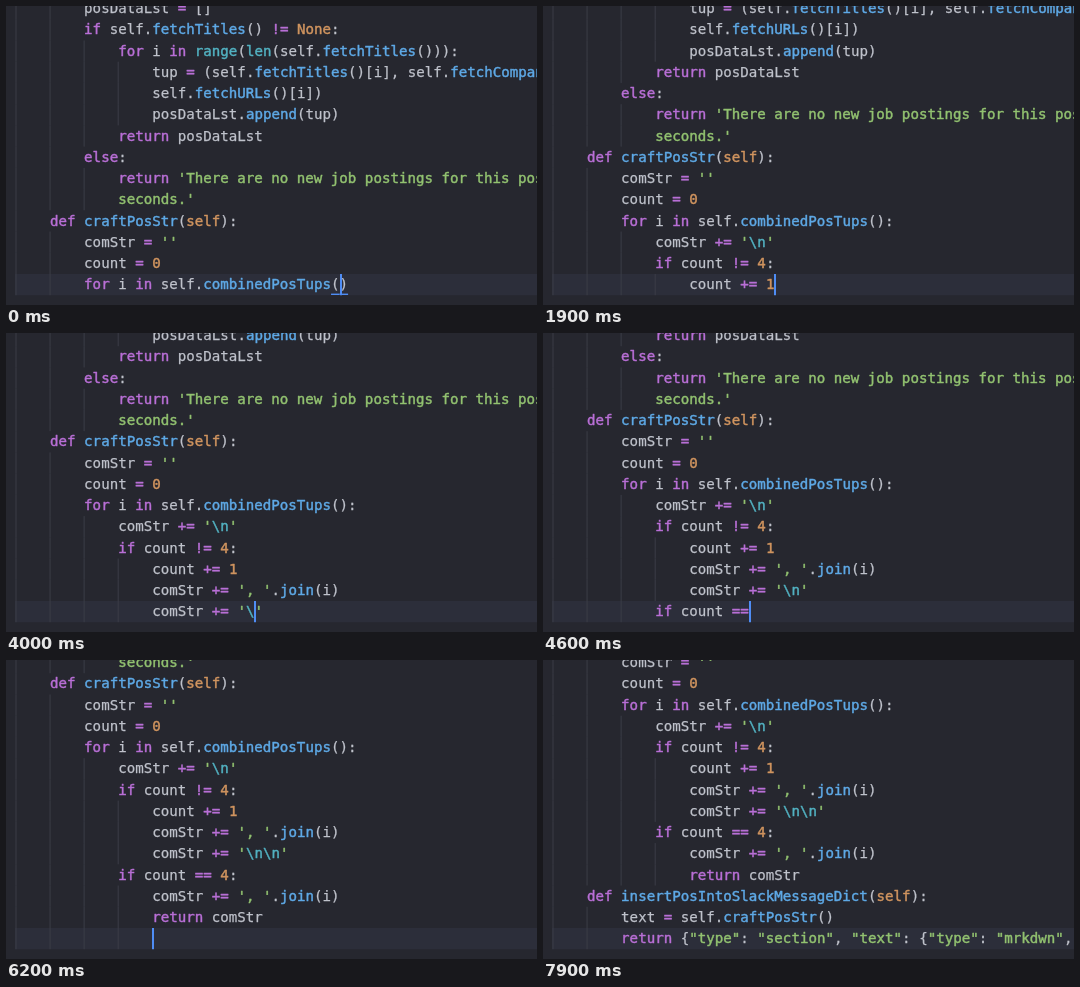
Animation, 531 px wide and 299 px high, one loop 8000 ms. Source, as an HTML page with a canvas:

```html
<!DOCTYPE html>
<html lang="en">
<head>
<meta charset="utf-8">
<title>Typing code</title>
<style>
html, body { margin: 0; width: 100%; height: 100%; overflow: hidden; background: #26272f; }
canvas { display: block; }
</style>
</head>
<body>
<canvas id="stage" width="531" height="299"></canvas>
<script>
const ctx = document.getElementById('stage').getContext('2d');
const LOOP = 8000, STEP = 100;
const LEFT = 10, CHAR = 8.515, PITCH = 21.23, LAST_TOP = 268, BASE = 15.2;
const MONO = '"DejaVu Sans Mono", monospace';
const FONT = '14.14px ' + MONO;
const C = {
  bg: '#26272f', line: '#2c2e3a', guide: '#3b3d47', text: '#bfc2cb', key: '#b96fd6',
  fn: '#5ea9e6', str: '#92c270', num: '#d0945f', esc: '#52b2c2', caret: '#4f8df5'
};

// [indent, text, start, end, midTime, midCount]; rows without times are already there
const rows = [
  [8, 'posDataLst = []'],
  [8, 'if self.fetchTitles() != None:'],
  [12, 'for i in range(len(self.fetchTitles())):'],
  [16, 'tup = (self.fetchTitles()[i], self.fetchCompanies()[i],'],
  [16, 'self.fetchURLs()[i])'],
  [16, 'posDataLst.append(tup)'],
  [12, 'return posDataLst'],
  [8, 'else:'],
  [12, "return 'There are no new job postings for this position in the last"],
  [12, "seconds.'"],
  [4, 'def craftPosStr(self):'],
  [8, "comStr = ''"],
  [8, 'count = 0'],
  [8, 'for i in self.combinedPosTups():', -1, 200, 0, 30],
  [12, "comStr += '\\n'", 250, 900],
  [12, 'if count != 4:', 950, 1450],
  [16, 'count += 1', 1500, 1900],
  [16, "comStr += ', '.join(i)", 1950, 3300, 3100, 21],
  [16, "comStr += '\\n'", 3350, 4100],
  [12, 'if count == 4:', 4150, 4700],
  [16, "comStr += ', '.join(i)", 4750, 5620, 5400, 13],
  [16, 'return comStr', 5650, 5800],
  [4, 'def insertPosIntoSlackMessageDict(self):', 6050, 6900, 6250, 0],
  [8, 'text = self.craftPosStr()', 6950, 7300],
  [8, 'return {"type": "section", "text": {"type": "mrkdwn", "text": text}}', 7350, 8000]
];
const WRAPPED = 9, EDITED = 18, EDIT_FROM = 5850, EDIT_TO = 6050;

const TOKEN = /'(?:\\.|[^'\\])*'?|"[^"]*"?|\d+|\w+|[!+=]+|\s+|./g;
const KEYWORDS = /^(if|for|in|return|else|def)$/;

function typedCount([, text, t0, t1, tm, nm], t) {
  const len = text.length;
  if (t0 === undefined || t >= t1) return len;
  const lerp = (a, b, from, to) => Math.floor(from + (to - from) * (t - a) / (b - a));
  if (tm === undefined) return lerp(t0, t1, 0, len);
  return t < tm ? lerp(t0, tm, 0, nm) : lerp(tm, t1, nm, len);
}

// Brackets and quotes the editor closes by itself
function closers(s) {
  const pair = { '(': ')', '[': ']', '{': '}' };
  const open = [];
  let quote = '';
  for (let i = 0; i < s.length; i++) {
    const c = s[i];
    if (quote) {
      if (c === '\\') i++;
      else if (c === quote) quote = '';
    } else if (c === "'" || c === '"') quote = c;
    else if (pair[c]) open.unshift(pair[c]);
    else if (c === open[0]) open.shift();
  }
  return quote + open.join('');
}

// A thin outline brings the regular face to medium weight
function write(s, x, y, color, weight) {
  ctx.fillStyle = ctx.strokeStyle = color;
  ctx.lineWidth = weight;
  ctx.fillText(s, x, y);
  ctx.strokeText(s, x, y);
}

function put(s, col, y, color) {
  write(s, LEFT + col * CHAR, y, color, color === C.text ? 0.25 : 0.45);
}

function tokenColor(s, text, at) {
  const inDef = text.startsWith('def ');
  if (KEYWORDS.test(s) || /^[!+=]+$/.test(s)) return C.key;
  if (/^\d+$/.test(s) || s === 'None') return C.num;
  if (s === 'self') return inDef ? C.num : C.text;
  if (s === 'range' || s === 'len') return C.esc;
  if (/^\w/.test(s) && (text[at + s.length] === '(' || (inDef && at === 4))) return C.fn;
  return C.text;
}

function drawCode(text, col, y) {
  for (const m of text.matchAll(TOKEN)) {
    const s = m[0], x = col + m.index;
    if (s[0] === "'" || s[0] === '"') {
      for (const p of s.matchAll(/\\n?|[^\\]+/g))
        put(p[0], x + p.index, y, p[0][0] === '\\' ? C.esc : C.str);
    } else if (s.trim()) put(s, x, y, tokenColor(s, text, m.index));
  }
}

function drawArrow(x, y) {
  ctx.fillStyle = '#83bd68';
  ctx.fillRect(x, y - 1, 7, 2.4);
  ctx.beginPath();
  ctx.moveTo(x + 5, y - 4.5);
  ctx.lineTo(x + 11, y);
  ctx.lineTo(x + 5, y + 4.5);
  ctx.fill();
  ctx.fillRect(x + 12, y - 5, 2.2, 10);
}

function drawPopup() {
  const items = [['idea', 'idea'], ['if', 'if'], ['ifmain', "if __name__ == '__main__'"],
    ['im', 'Import'], ['ipdb', 'iPDB set trace']];
  const x = 276, top = 127, h = 28.3;
  ctx.fillStyle = '#24262e';
  ctx.fillRect(x, top, 255, h * items.length);
  ctx.fillStyle = '#34423e';
  ctx.fillRect(x, top, 28, h * items.length);
  ctx.fillStyle = '#343743';
  ctx.fillRect(x + 28, top, 227, h);
  ctx.fillStyle = '#40544a';
  ctx.fillRect(x, top, 28, h);
  items.forEach(([name, note], i) => {
    const y = top + h * (i + 0.5);
    drawArrow(x + 7, y + 0.5);
    ctx.font = 'bold ' + FONT;
    write(name[0], 315, y + 4.5, '#f0f1f5', 0.2);
    ctx.font = FONT;
    write(name.slice(1), 315 + CHAR, y + 4.5, i ? '#b9bcc6' : '#d0d2da', 0.45);
    ctx.font = '12.55px ' + MONO;
    write(note, 381, y + 4, i ? '#757883' : '#9a9da8', 0.25);
  });
  ctx.font = FONT;
}

function draw(t) {
  let last = 0;
  rows.forEach((r, i) => { if (r[2] === undefined || t >= r[2]) last = i; });
  const editing = t >= EDIT_FROM && t < EDIT_TO;
  const active = editing ? EDITED : last;
  const topOf = i => LAST_TOP - (last - i) * PITCH;

  ctx.fillStyle = C.bg;
  ctx.fillRect(0, 0, 531, 299);
  ctx.fillStyle = C.line;
  ctx.fillRect(LEFT - 1, topOf(active), 531, PITCH);
  ctx.font = FONT;
  ctx.lineJoin = 'round';

  let popup = false;
  for (let i = Math.max(0, last - 13); i <= last; i++) {
    const row = rows[i], top = topOf(i), y = top + BASE;
    const count = typedCount(row, t);
    const col = i === 22 && !count ? 16 : row[0];
    let head = row[1].slice(0, count);
    if (i === EDITED && t >= EDIT_FROM) head = head.slice(0, -1) + "\\n'";

    ctx.fillStyle = C.guide;
    for (let g = 0; g < col; g += 4) ctx.fillRect(LEFT + g * CHAR - 0.5, top, 1, PITCH);

    const tail = closers(head);
    if (i === WRAPPED) put(head, col, y, C.str);
    else drawCode(i === last ? head + tail : head, col, y);

    if (i !== active) continue;
    const caretCol = col + head.length - (editing ? 1 : 0);
    ctx.fillStyle = C.caret;
    ctx.fillRect(Math.round(LEFT + caretCol * CHAR), top, 2, PITCH);
    if (tail === ')') {
      const open = col + head.lastIndexOf('(');
      ctx.fillRect(LEFT + open * CHAR, top + 19.6, CHAR, 1.4);
      ctx.fillRect(LEFT + caretCol * CHAR, top + 19.6, CHAR, 1.4);
    }
    popup = head.endsWith('join(i') && i === 17;
  }
  if (popup) drawPopup();
}

const begin = performance.now();
function frame() {
  const t = (performance.now() - begin) % LOOP;
  draw(Math.floor(t / STEP) * STEP);
  requestAnimationFrame(frame);
}
frame();
</script>
</body>
</html>
```
